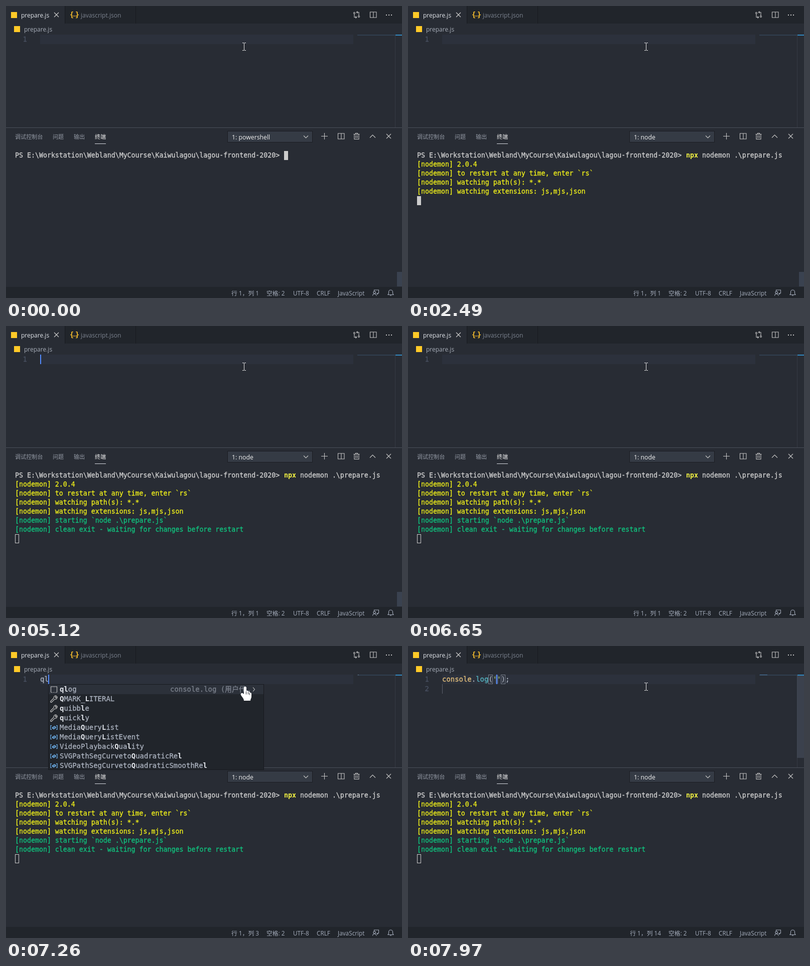
An HTML page with a canvas for the animation above (8000 ms loop, 789 by 582 pixels).

```html
<!DOCTYPE html>
<html lang="zh">
<head>
<meta charset="utf-8">
<style>
html, body { margin: 0; width: 100%; height: 100%; overflow: hidden; background: #282c34; }
canvas { display: block; }
</style>
</head>
<body>
<canvas id="stage" width="789" height="582"></canvas>
<script>
const ctx = document.getElementById('stage').getContext('2d');
const LOOP = 8000;
const CHAR = 8.4, TERM_CHAR = 8, ROW = 19;
const CJK = '"Noto Sans CJK SC", "Noto Sans CJK", sans-serif';
const ui = size => `${size}px "Open Sans", ${CJK}`;
const mono = (advance, weight = '') => `${weight} ${advance / 0.602}px "DejaVu Sans Mono", ${CJK.replace('sans-serif', 'monospace')}`;

const ICONS = {
  close: 'M-4.5 -4.5L4.5 4.5M4.5 -4.5L-4.5 4.5',
  plus: 'M-6.5 0H6.5M0 -6.5V6.5',
  split: 'M-6 -5.5H6.5V5.5H-6ZM.5 -5.5V5.5',
  trash: 'M-6 -4H6M-2 -4V-6H2V-4M-4.5 -4V6H4.5V-4M-1.5 -2V4M1.5 -2V4',
  up: 'M-5.5 3L0 -2.5L5.5 3',
  down: 'M-4.5 -2L0 2.5L4.5 -2',
  right: 'M-1.5 -4L2 0L-1.5 4',
  compare: 'M-4.5 -1.5V5H0M-2 3L0 5L-2 7M4.5 1.5V-5H0M2 -7L0 -5L2 -3M-6 -3.5a1.5 1.5 0 1 0 3 0a1.5 1.5 0 1 0 -3 0M3 3.5a1.5 1.5 0 1 0 3 0a1.5 1.5 0 1 0 -3 0',
  feedback: 'M-3 -3V-5.5H6V1H4V3L2 1M-4.5 -.5a2.2 2.2 0 1 0 4.4 0a2.2 2.2 0 1 0 -4.4 0M-6 6C-6 1 1.5 1 1.5 6',
  bell: 'M-5.5 4H5.5L4 1.5V-1.5A4 4 0 0 0 -4 -1.5V1.5ZM-1.5 5.5H1.5',
  wrench: 'M-6.5 4.5L-.5 -1.5A4 4 0 0 1 5 -6L2.5 -3.5L4 -2L6.5 -4.5A4 4 0 0 1 1.5 .5L-4.5 6.5A1.4 1.4 0 0 1 -6.5 4.5Z',
  cube: 'M0 -6L5.5 -3V3L0 6L-5.5 3V-3ZM-5.5 -3L0 0L5.5 -3M0 0V6',
  snippet: 'M-6 6V-5.5H6V6M-5 6H-3M-1 6H1M3 6H5',
  variable: 'M-4.5 -4H-6.5V4H-4.5M4.5 -4H6.5V4H4.5M-3 0L1 -2.5L3.5 -1V1L-.5 3L-3 1.5ZM-3 0L-.5 1L3.5 -1',
  hand: 'M-2 -10C-2 -13 2 -13 2 -10V-3C5 -5 6 -3 6 -2C8 -3 9 -1 9 0C11 -1 12 1 12 2V7C12 11 10 12 10 15H-2C-2 11 -5 9 -8 4C-9 1 -6 0 -4 2L-2 4Z',
  knuckles: 'M2 -3V3M6 -2V3M9 0V4',
};
const ICON_COLORS = { wrench: '#c5c5c5', cube: '#b180d7', snippet: '#c5c5c5', variable: '#75beff' };

const SUGGESTIONS = {
  q: [
    ['wrench', 'queue', 'Type PelVord::sem'], ['wrench', 'quotes'], ['wrench', 'q.push(append(q.pop(),'],
    ['wrench', 'query'], ['wrench', 'qmark'], ['cube', 'queueMicrotask'],
    ['snippet', 'qlog', 'console.log (用户代码…'],
    ['variable', 'ByteLengthQueuingStrategy'], ['variable', 'CountQueuingStrategy'],
    ['variable', 'MediaQueryList'], ['variable', 'MediaQueryListEvent'], ['variable', 'SVGPathSegCurvetoQuadraticAbs'],
  ],
  ql: [
    ['snippet', 'qlog', 'console.log (用户代…'], ['wrench', 'QMARK_LITERAL'], ['wrench', 'quibble'], ['wrench', 'quickly'],
    ['variable', 'MediaQueryList'], ['variable', 'MediaQueryListEvent'], ['variable', 'VideoPlaybackQuality'],
    ['variable', 'SVGPathSegCurvetoQuadraticRel'], ['variable', 'SVGPathSegCurvetoQuadraticSmoothRel'],
  ],
  qlo: [['snippet', 'qlog', 'console.log (用户代…']],
};

const PROMPT = 'PS E:\\Workstation\\Webland\\MyCourse\\Kaiwulagou\\lagou-frontend-2020>';
const COMMAND = ' nodemon .\\prepare.js';
const OUTPUT = [
  [2490, '2.0.4'], [2490, 'to restart at any time, enter `rs`'], [2490, 'watching path(s): *.*'],
  [2490, 'watching extensions: js,mjs,json'], [2510, 'starting `node .\\prepare.js`'],
  [2710, 'clean exit - waiting for changes before restart'],
];

function rect(x, y, w, h, color) {
  ctx.fillStyle = color;
  ctx.fillRect(x, y, w, h);
}

function frame(x, y, w, h, color) {
  ctx.strokeStyle = color;
  ctx.lineWidth = 1;
  ctx.strokeRect(x + .5, y + .5, w - 1, h - 1);
}

function text(str, x, y, color, font, align = 'left') {
  ctx.font = font;
  ctx.fillStyle = color;
  ctx.textAlign = align;
  ctx.fillText(str, x, y);
}

// A hairline outline gives regular monospace a medium weight.
function code(str, x, y, color, advance = CHAR, align = 'left') {
  text(str, x, y, color, mono(advance), align);
  ctx.strokeStyle = color;
  ctx.lineWidth = .3;
  ctx.strokeText(str, x, y);
}

function icon(name, x, y, color = '#c5c5c5', fill) {
  const path = new Path2D(ICONS[name]);
  ctx.save();
  ctx.translate(x + .5, y + .5);
  ctx.lineWidth = 1.1;
  ctx.strokeStyle = color;
  if (fill) { ctx.fillStyle = fill; ctx.fill(path); }
  ctx.stroke(path);
  ctx.restore();
}

function drawHeader() {
  rect(0, 0, 789, 35, '#21252b');
  rect(0, 0, 117, 35, '#282c34');
  rect(117, 0, 1, 35, '#181a1f');
  rect(258, 0, 1, 35, '#181a1f');
  rect(10, 12, 12, 12, '#ffca28');
  rect(16, 40, 12, 12, '#ffca28');
  text('prepare.js', 30, 23, '#dfe2e8', ui(12));
  icon('close', 100, 17, '#d0d0d0');
  text('{', 127, 22, '#fbc02d', mono(8, 'bold'));
  text('}', 138, 22, '#fbc02d', mono(8, 'bold'));
  for (const x of [133, 136, 139]) rect(x, 19, 1.5, 2, '#fbc02d');
  text('javascript.json', 149, 23, '#7b828e', ui(12.1));
  text('prepare.js', 36, 51, '#a6acb7', ui(12));
  icon('compare', 698, 17);
  icon('split', 731, 17);
  for (const x of [757, 762, 767]) rect(x, 17, 2, 2, '#c5c5c5');
}

function drawCode(t, typed, done) {
  rect(68, 57, 624, ROW, '#2c313c');
  code('1', 42, 71, '#495162', CHAR, 'right');
  rect(700, 57, 76, 2, '#313f50');
  rect(775, 57, 1, 185, '#353a43');
  if (done) {
    const shown = Math.min(1, (t - 7840) / 120);
    rect(775, 58, 14, 165, `rgba(78,86,102,${.5 * shown})`);
    code('2', 42, 90, '#495162', CHAR, 'right');
    rect(68, 76, 1, ROW, '#5a606b');
    rect(174, 58, 6, 17, '#454b57');
    const parts = [['console', '#e5c07b'], ['.', '#abb2bf'], ['log', '#56b6c2'], ['(', '#abb2bf'],
      ["''", '#98c379'], [');', '#abb2bf']];
    let column = 0;
    for (const [str, color] of parts) {
      code(str, 68 + column * CHAR, 71, color);
      column += str.length;
    }
    frame(160, 57, 9, ROW, '#747b87');
    frame(185, 57, 9, ROW, '#747b87');
    rect(701, 57, 15, 1, '#4b79a5');
  } else {
    code(typed, 68, 71, '#abb2bf');
    if (typed) rect(701, 57, typed.length, 1, '#657382');
  }
  rect(776, 57, 13, 2, '#3288c0');
  const caretOn = t >= 5120 && !(t >= 5700 && t < 6150) && !(t >= 6650 && t < 6910);
  const column = done ? 13 : typed.length;
  if (caretOn) rect(Math.max(68, Math.round(67 + CHAR * column)), 57, 2, ROW, '#528bff');
}

function drawTerminal(t) {
  rect(0, 242, 789, 1, '#4a4f59');
  [['调试控制台', 18], ['问题', 93], ['输出', 135], ['终端', 177]].forEach(([label, x], i) =>
    text(label, x, 265, i === 3 ? '#efefef' : '#9298a3', ui(11.1)));
  rect(177, 274, 22, 1, '#d7dae0');
  rect(441, 249, 170, 23, '#353b45');
  frame(441, 249, 170, 23, '#1b1d23');
  text(t < 1370 ? '1: powershell' : '1: node', 450, 266, '#f0f0f0', ui(12.3));
  icon('down', 597, 260);
  icon('plus', 634, 259);
  icon('split', 667, 259);
  icon('trash', 698, 259);
  icon('up', 730, 259);
  icon('close', 762, 259);

  code(PROMPT, 18, 302, '#d0d0d0', TERM_CHAR);
  if (t >= 800) {
    text('npx', 554, 302, '#f5f543', mono(TERM_CHAR, 'bold'));
    code(COMMAND, 578, 302, '#d0d0d0', TERM_CHAR);
  }
  const lines = OUTPUT.filter(([start]) => t >= start);
  lines.forEach(([, str], i) =>
    code('[nodemon] ' + str, 18, 320 + i * 18, i < 4 ? '#f0f01a' : '#10c47f', TERM_CHAR));

  const x = t < 800 ? 554 : t < 1300 ? 746 : 18;
  const y = t < 1300 ? 289 : 307 + lines.length * 18;
  if (t < 5120) rect(x, y, 8, 18, '#cccccc');
  else frame(x, y, 8, 18, '#cccccc');
  if (t < 5410) rect(779, 530, 10, 29, '#3a4250');
}

function drawStatus(column) {
  rect(0, 560, 789, 22, '#21252b');
  const put = (str, x, align) => text(str, x, 577, '#a5adbc', ui(11.8), align);
  put(`行 1，列 ${column}`, 504, 'right');
  put('空格: 2', 519);
  put('UTF-8', 572);
  put('CRLF', 619);
  put('JavaScript', 661);
  icon('feedback', 736, 571, '#a5adbc');
  icon('bell', 766, 571, '#a5adbc');
}

// Letters matched in order by the query are emphasised.
function drawMatch(label, query, x, y) {
  let next = 0;
  [...label].forEach((char, i) => {
    const left = x + i * CHAR;
    if (char.toLowerCase() === query[next]) {
      next++;
      text(char, left, y, '#e3e6ec', mono(CHAR, 'bold'));
    } else {
      code(char, left, y, '#abb2bf');
    }
  });
}

function drawPopup(query, column, chevron) {
  const items = SUGGESTIONS[query];
  const x = Math.round(68.5 + column * CHAR);
  const height = items.length * ROW;
  rect(x, 76, 428, height, '#21252b');
  rect(x, 77, 428, ROW, '#2c313a');
  items.forEach(([kind, label, detail], i) => {
    const y = 86 + i * ROW;
    icon(kind, x + 10, y, ICON_COLORS[kind]);
    drawMatch(label, query, x + 22, y + 5);
    if (detail) code(detail, x + 242, y + 5, '#7b818c');
  });
  if (chevron) icon('right', x + 408, 86);
  frame(x - 1, 76, 430, height, '#181a1f');
}

function drawPointer(hand) {
  if (hand) {
    icon('hand', 476, 93, '#ffffff', '#ffffff');
    icon('knuckles', 476, 93, '#30343c');
    return;
  }
  rect(474, 74, 1, 14, '#e8e8e8');
  for (const y of [73, 88]) {
    rect(471, y, 3, 1, '#e8e8e8');
    rect(475, y, 3, 1, '#e8e8e8');
  }
}

function draw(t) {
  const typed = 'qlo'.slice(0, [6910, 7230, 7380].filter(start => t >= start).length);
  const done = t >= 7840;
  rect(0, 0, 789, 582, '#282c34');
  drawHeader();
  drawCode(t, typed, done);
  drawTerminal(t);
  drawStatus(done ? 14 : typed.length + 1);
  const popup = t >= 7100 && !done;
  if (popup) drawPopup(t < 7250 ? 'q' : t < 7420 ? 'ql' : 'qlo', typed.length, t >= 7120);
  drawPointer(popup);
}

function tick(now) {
  draw(now % LOOP);
  requestAnimationFrame(tick);
}
requestAnimationFrame(tick);
</script>
</body>
</html>
```
